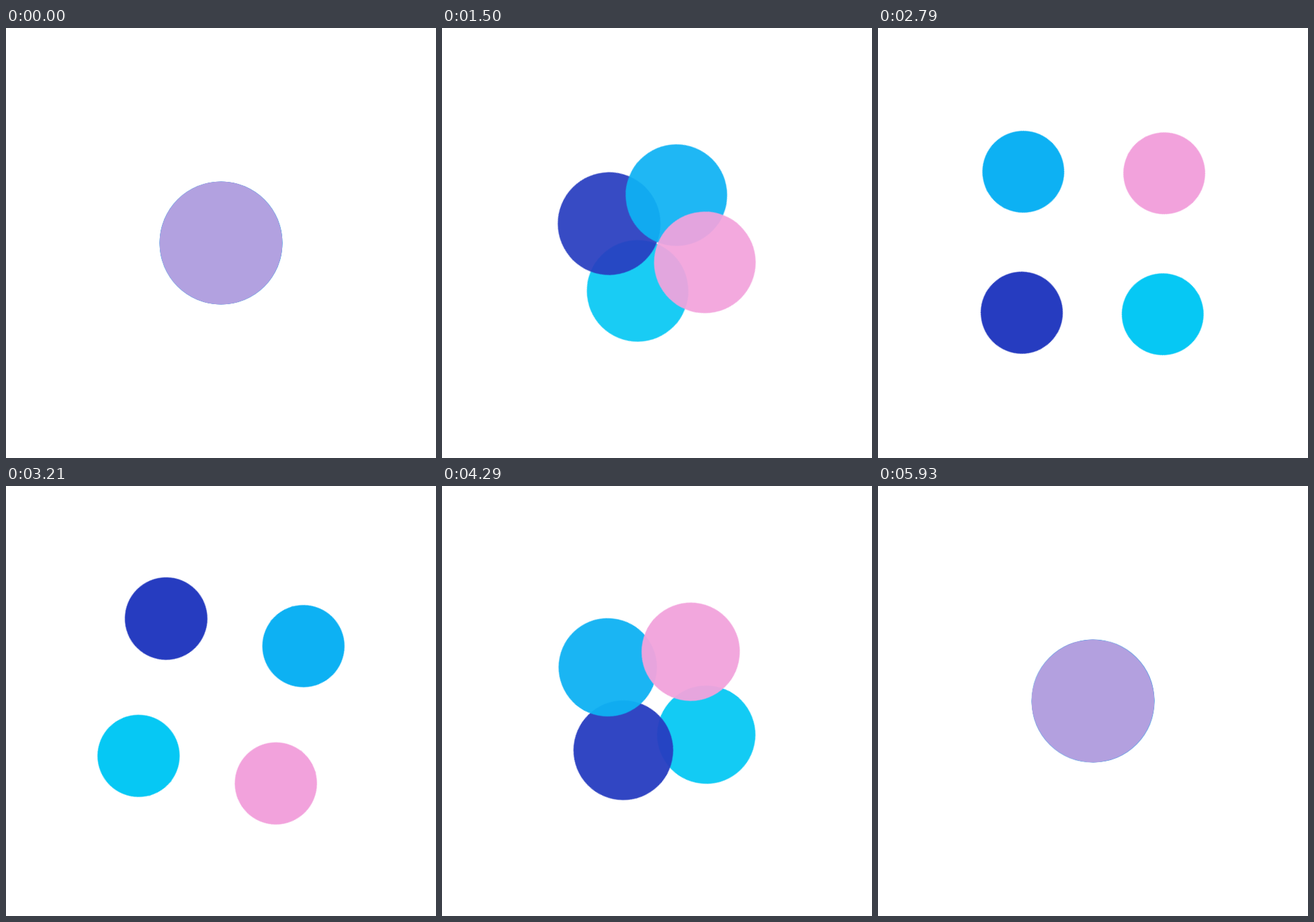
An HTML page that plays this animation: 640 px wide and 640 px high, repeating every 6000 ms.

```html
<!DOCTYPE html>
<html lang="en">
<head>
<meta charset="utf-8">
<title>Four dots</title>
<style>
  html, body { margin: 0; width: 100%; height: 100%; overflow: hidden; background: #fff; }
  svg { display: block; width: 100%; height: 100%; }

  .spin, circle {
    animation-duration: 6s;
    animation-delay: -24ms;
    animation-iteration-count: infinite;
  }
  .spin {
    animation-name: spin;
    animation-timing-function: cubic-bezier(.25, 0, .75, 1);
  }
  circle {
    r: 91.4px;
    animation-name: spread, shrink, fade;
    animation-timing-function: cubic-bezier(.333, 0, .667, 1), cubic-bezier(.333, 0, .667, 1), linear;
  }
  .dark { animation-name: spread, shrink-dark, fade; }

  @keyframes spin {
    from { transform: rotate(-180deg); }
    to { transform: rotate(900deg); }
  }
  @keyframes spread {
    0%, 100% { cx: 0px; }
    50% { cx: 150px; }
  }
  @keyframes shrink {
    0%, 100% { r: 91.4px; }
    50% { r: 60.6px; }
  }
  /* The dark dot swells back a little sooner than the others. */
  @keyframes shrink-dark {
    0% { r: 91.4px; animation-timing-function: cubic-bezier(.33, 0, .72, 1); }
    50% { r: 60.6px; animation-timing-function: cubic-bezier(.25, 0, .7, 1); }
    100% { r: 91.4px; }
  }
  @keyframes fade {
    0%, 100% { opacity: .7; }
    33.333%, 66.667% { opacity: 1; }
  }
</style>
</head>
<body>
<svg viewBox="0 0 640 640">
  <g transform="translate(320 320)">
    <g class="spin">
      <g transform="rotate(90)"><circle fill="#06c8f4"/></g>
      <g transform="rotate(180)"><circle class="dark" fill="#263cc0"/></g>
      <g transform="rotate(-90)"><circle fill="#0db1f3"/></g>
      <circle fill="#f2a2dc"/>
    </g>
  </g>
</svg>
</body>
</html>
```
